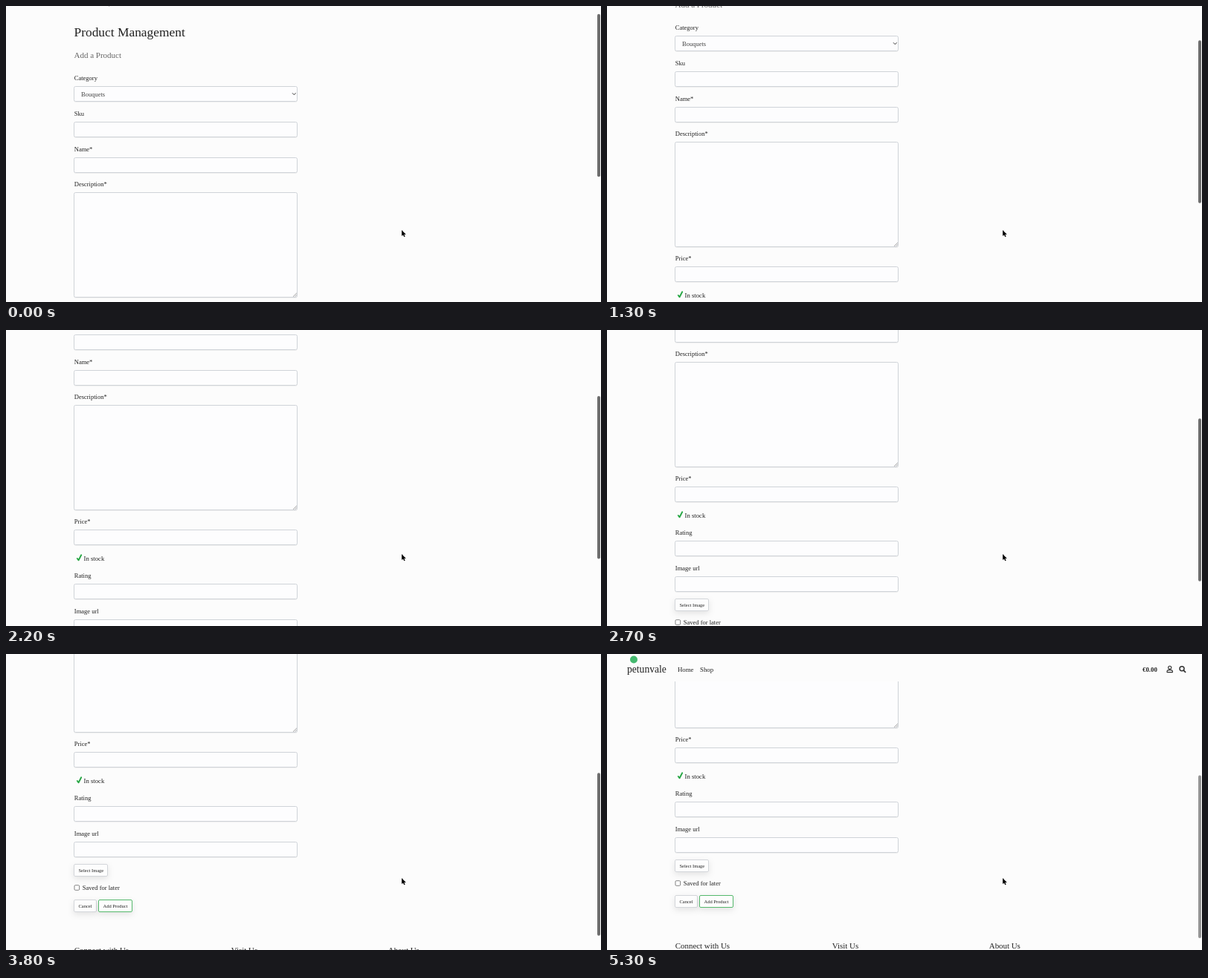
Animation of 800x399 px, one loop 5400 ms. Source, as an HTML page:

```html
<!DOCTYPE html>
<html lang="en">
<head>
<meta charset="utf-8">
<title>Product form</title>
<style>
html, body { margin: 0; width: 100%; height: 100%; overflow: hidden; background: #fcfcfc; }
svg { display: block; width: 100vw; height: 100vh; }
text { font-family: "Liberation Serif", serif; fill: #222; }
.box { fill: #fdfdfe; stroke: #cfd3d8; }
.shade { fill: none; stroke: #000; stroke-opacity: .05; }
.button { fill: #fdfdfd; filter: drop-shadow(0 3px 4px rgba(0, 0, 0, .1)); }
.line { fill: none; stroke: #333; stroke-linecap: round; stroke-linejoin: round; }
</style>
</head>
<body>
<svg viewBox="0 0 800 399">
  <g id="page">
    <path class="line" d="M140.4 -1.5L139 .1" stroke-width=".9"/>
  </g>
  <g id="header">
    <rect width="794" height="37" fill="#fcfcfc"/>
    <circle cx="36" cy="7.5" r="5" fill="#45b96f"/>
    <g class="line" stroke-width="1.1">
      <circle cx="756.7" cy="18.3" r="2.1"/>
      <path d="M753 24.6v-.8q0-2.2 2.2-2.2h3q2.2 0 2.2 2.2v.8z"/>
      <circle cx="773" cy="19.8" r="3" stroke-width="1.5"/>
      <path d="M775.3 22.1l2.3 2.3" stroke-width="1.7"/>
    </g>
  </g>
  <rect id="thumb" x="795" width="4" height="219.5" rx="2" fill="#6d6d6d"/>
  <path d="M532 302v8.1l1.9-1.7 1.3 2.9 1.4-.6-1.3-2.8h2.5z"
        fill="#000" stroke="#fff" stroke-width=".8" paint-order="stroke"/>
</svg>
<script>
const LOOP = 5400, STEP = 100;
const [page, header, thumb] = ["page", "header", "thumb"].map(id => document.getElementById(id));

function add(parent, tag, attrs, content = "") {
  const el = document.createElementNS("http://www.w3.org/2000/svg", tag);
  for (const key in attrs) el.setAttribute(key, attrs[key]);
  el.textContent = content;
  parent.append(el);
  return el;
}

function label(content, x, y, size = 8.5, style = "", parent = page) {
  add(parent, "text", { x, y, "font-size": size, style }, content);
}

function field(y, height = 20) {
  const shape = { x: 91.5, width: 300, height, rx: 2 };
  add(page, "rect", { ...shape, y: y + 1, class: "shade" });
  add(page, "rect", { ...shape, y, class: "box" });
}

function button(content, x, y, width, stroke = "#d3d6da") {
  add(page, "rect", { x, y, width, height: 16, rx: 1.5, stroke, class: "button" });
  label(content, x + 6, y + 10.2, 6.5);
}

function line(d, stroke, width) {
  add(page, "path", { d, class: "line", style: `stroke:${stroke};stroke-width:${width}` });
}

label("Product Management", 91.5, 41, 17.4);
label("Add a Product", 91.5, 69.7, 11, "fill:#686868");

const fields = [["Category", 100, 108.5], ["Sku", 147.8, 156.5], ["Name*", 195.5, 204.5],
  ["Description*", 243.3, 251.5, 141], ["Price*", 411.3, 419.5], ["Rating", 484, 492.5],
  ["Image url", 531.5, 540.5]];
for (const [name, baseline, top, height] of fields) {
  label(name, 91.8, baseline);
  field(top, height);
}

label("Bouquets", 101, 121.5, 8.5, "fill:#444");
line("M385.3 117.6l2 2.1 2-2.1", "#333", 1);
line("M386.3 391.5l4.3-4.3M388.8 391.5l1.8-1.8", "#777", .7);

line("M95.8 458l1.8 2.3 3.6-7", "#28a745", 1.9);
label("In stock", 104.5, 460.7, 8.7);

button("Select Image", 91.5, 570.5, 45);
add(page, "rect", { x: 92, y: 598.7, width: 6.6, height: 6.6, rx: 1.2, fill: "#fff", stroke: "#777", "stroke-width": .9 });
label("Saved for later", 102.8, 605);
button("Cancel", 91.5, 618.5, 30);
button("Add Product", 124.5, 618.5, 45, "#55b96c");

["Connect with Us", "Visit Us", "About Us"].forEach((name, i) =>
  label(name, 91.8 + 211 * i, 689.5, 10.9));

label("petunvale", 27, 24.5, 13.6, "", header);
label("Home", 95, 24, 8.8, "", header);
label("Shop", 125, 24, 8.8, "", header);
label("€0.00", 720, 23.7, 8.8, "font-weight:bold", header);

// Scroll gestures: start, duration, distance, decay
const swipes = [[0, 400, 28, 4], [700, 600, 40, 5], [1500, 700, 82, 5],
  [2400, 700, 75, 5], [3300, 900, 72, 4], [4500, 200, -4, 1]];

const progress = (t, start, length) => Math.min(1, Math.max(0, (t - start) / length));

function scrollAt(t) {
  return Math.round(swipes.reduce((sum, [start, length, distance, decay]) =>
    sum + distance * (1 - (1 - progress(t, start, length) ** 1.6) ** decay), 0));
}

function draw(time) {
  const t = Math.floor((time % LOOP) / STEP) * STEP;
  const scroll = scrollAt(t);
  const reveal = progress(t, 4900, 400);
  const slide = 1 - (1 - reveal) ** 2;
  page.setAttribute("transform", `translate(0 ${-scroll})`);
  header.setAttribute("transform", `translate(0 ${-40 * (1 - slide)})`);
  header.setAttribute("visibility", reveal ? "visible" : "hidden");
  thumb.setAttribute("y", 10.8 + scroll * .521);
  thumb.setAttribute("opacity", 1 - .28 * reveal);
}

let begin;
function tick(now) {
  begin ??= now;
  draw(now - begin);
  requestAnimationFrame(tick);
}
draw(0);
requestAnimationFrame(tick);
</script>
</body>
</html>
```
